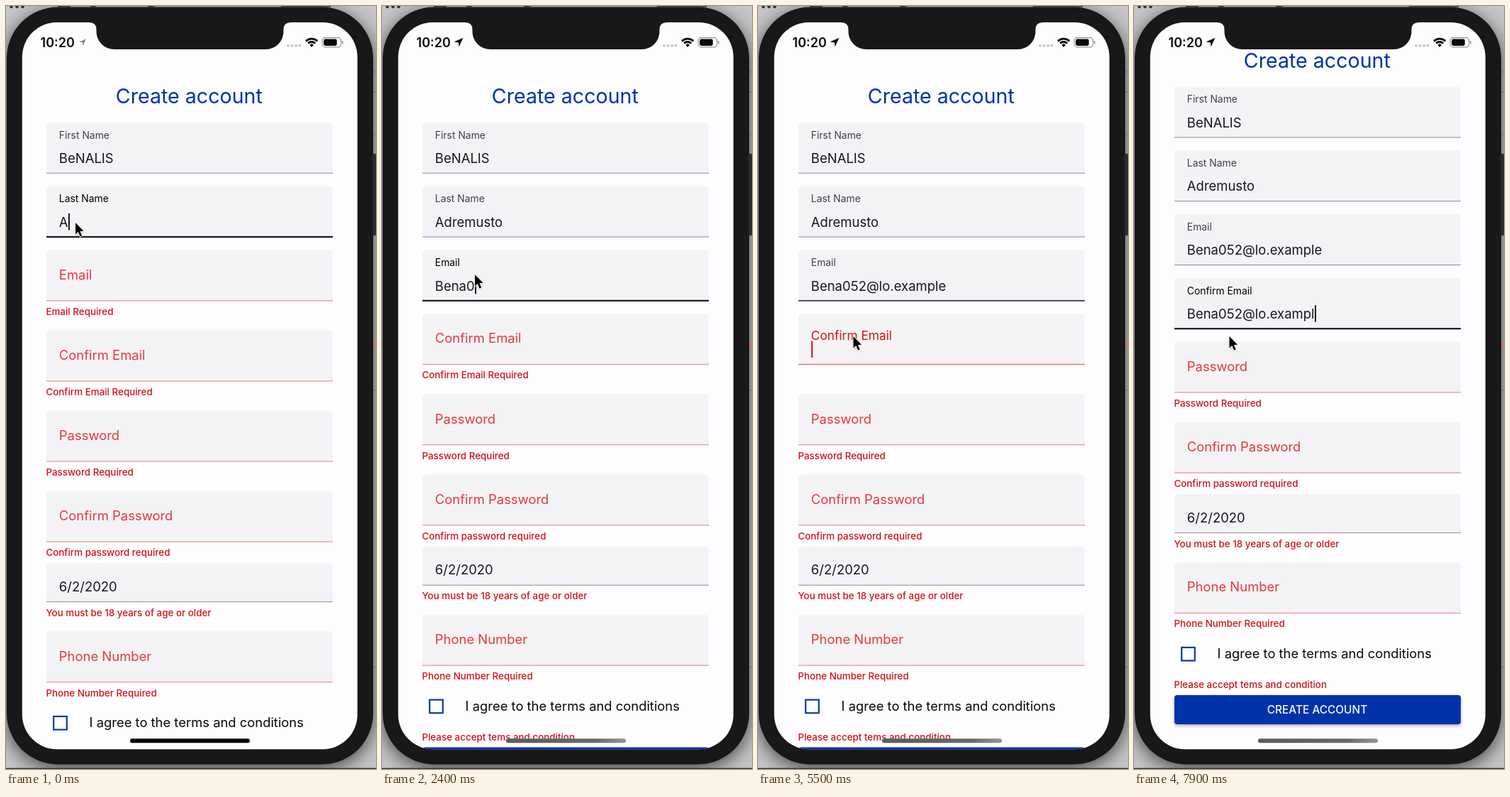
Recreate the animation shown at these times as an HTML page with a canvas. Size 522 px wide and 1074 px high, loop 8 s.

```html
<!DOCTYPE html>
<html lang="en">
<head>
<meta charset="utf-8">
<title>Create account</title>
<style>
html, body { margin: 0; width: 100%; height: 100%; overflow: hidden; }
canvas { display: block; }
</style>
</head>
<body>
<canvas id="stage" width="522" height="1074"></canvas>
<script>
const ctx = document.getElementById('stage').getContext('2d');
const LOOP = 8000, STEP = 100;
const LEFT = 57, WIDTH = 404, TEXT_X = 74.8;
const ERROR_GAP = 23.4, SCROLL = 50.3;
const FLOAT_MS = 300;

const BLACK = [24, 23, 28], GREY = [143, 142, 148], INK = [66, 65, 70];
const RED = [207, 19, 22], PLACEHOLDER = [227, 58, 60], PINK = [233, 155, 155];
const BLUE = '#0033a8', BEZEL = '#18171a';

const FIRST_NAME = 'BeNALIS';
const LAST_NAME = 'Adremusto';
const EMAIL = 'Bena052@lo.example';

// Each run is [first key time, interval, number of keys].
const keyTimes = runs => runs.flatMap(([start, gap, n]) =>
  Array.from({ length: n }, (_, i) => start + i * gap));
const LAST_KEYS = keyTimes([[0, 115, 9]]);
const EMAIL_KEYS = keyTimes([[1700, 150, 8], [3500, 130, 10]]);
const CONFIRM_KEYS = keyTimes([[5850, 125, 6], [6600, 125, 11]]);
const EMAIL_FOCUS = 1540, CONFIRM_FOCUS = 5400;

const clamp = v => Math.max(0, Math.min(1, v));
const progress = (t, start, ms) => clamp((t - start) / ms);
const lerp = (a, b, p) => a + (b - a) * p;
const smooth = p => (1 - Math.cos(Math.PI * p)) / 2;
const easeOut = p => 1 - (1 - p) ** 3;
const rgb = c => `rgb(${c.map(Math.round).join(',')})`;
const mix = (a, b, p) => a.map((v, i) => lerp(v, b[i], p));

function text(str, x, y, size, color, weight = 400, align = 'left') {
  ctx.font = `${weight} ${size}px Inter, sans-serif`;
  ctx.textAlign = align;
  ctx.fillStyle = color;
  ctx.fillText(str, x, y);
}

function box(x, y, w, h, r, color) {
  ctx.fillStyle = color;
  ctx.beginPath();
  ctx.roundRect(x, y, w, h, r);
  ctx.fill();
}

function shape(points, color) {
  ctx.fillStyle = color;
  ctx.beginPath();
  points.forEach(([x, y]) => ctx.lineTo(x, y));
  ctx.closePath();
  ctx.fill();
}

function panel(y, h, lineColor, lineWidth) {
  box(LEFT, y, WIDTH, h, [5, 5, 0, 0], '#f3f2f5');
  ctx.fillStyle = rgb(lineColor);
  ctx.fillRect(LEFT, y + h - 0.7 - lineWidth / 2, WIDTH, lineWidth);
}

function errorText(str, y) {
  text(str, 56.4, y, 13.4, rgb(RED), 500);
}

// A field moves through idle, focused and blurred states at the given times.
function field(t, y, { label, value = '', keys = [], focus = Infinity, blur = Infinity, error }) {
  const count = keys.filter(k => k <= t).length;
  const typed = keys.length ? value.slice(0, count) : value;
  const focused = t >= focus && t < blur;
  const hasError = Boolean(error) && !count;
  const float = error ? smooth(progress(t, focus, FLOAT_MS)) : 1;
  const blurred = progress(t, blur, FLOAT_MS);

  let line = GREY, lineWidth = 1, labelColor = INK;
  if (hasError) {
    line = mix(PINK, RED, float);
    lineWidth = lerp(1.3, 2.2, float);
    labelColor = focused ? RED : PLACEHOLDER;
  } else if (t >= focus) {
    line = mix(BLACK, GREY, blurred);
    if (error) line = mix(RED, line, progress(t, keys[0], 250));
    lineWidth = lerp(2.2, 1, blurred);
    labelColor = focused ? [0, 0, 0] : INK;
  }

  panel(y, 72, line, lineWidth);
  text(label, TEXT_X, y + lerp(41.2, 22.6, float), lerp(18.45, 13.9, float), rgb(labelColor));
  text(typed, TEXT_X, y + 57, 18.5, rgb(BLACK));

  if (focused) {
    const since = t - (count ? keys[count - 1] : focus);
    const x = TEXT_X + ctx.measureText(typed).width + 0.4;
    if (since % 1000 < 500) {
      ctx.fillStyle = rgb(hasError ? RED : BLACK);
      ctx.fillRect(x, y + 38.3, 2, 23.5);
    }
  }
  if (hasError && !focused) errorText(error, y + 91.2);
}

function form(t) {
  const scroll = SCROLL * easeOut(progress(t, CONFIRM_KEYS[0], 550));
  const afterEmail = t >= EMAIL_KEYS[0] ? ERROR_GAP : 0;
  const afterConfirm = afterEmail + (t >= CONFIRM_KEYS[0] ? ERROR_GAP : 0);

  ctx.save();
  ctx.translate(0, -scroll);
  text('Create account', 258.3, 137.3, 28.6, BLUE, 400, 'center');
  field(t, 164, { label: 'First Name', value: FIRST_NAME });
  field(t, 253.7, { label: 'Last Name', value: LAST_NAME, keys: LAST_KEYS, focus: 0, blur: EMAIL_FOCUS });
  field(t, 343.5, { label: 'Email', value: EMAIL, keys: EMAIL_KEYS,
    focus: EMAIL_FOCUS, blur: CONFIRM_FOCUS, error: 'Email Required' });
  field(t, 456.6 - afterEmail, { label: 'Confirm Email', value: EMAIL, keys: CONFIRM_KEYS,
    focus: CONFIRM_FOCUS, error: 'Confirm Email Required' });

  ctx.translate(0, -afterConfirm);
  field(t, 569.7, { label: 'Password', error: 'Password Required' });
  field(t, 682.8, { label: 'Confirm Password', error: 'Confirm password required' });
  panel(784.3, 55, GREY, 1);
  text('6/2/2020', TEXT_X, 823.6, 18.5, rgb(BLACK));
  errorText('You must be 18 years of age or older', 858.8);
  field(t, 880.3, { label: 'Phone Number', error: 'Phone Number Required' });

  ctx.strokeStyle = '#0b3aa6';
  ctx.lineWidth = 2.2;
  ctx.strokeRect(67.2, 1000, 18.6, 18.6);
  text('I agree to the terms and conditions', 117.6, 1015, 18.4, '#09080c');
  errorText('Please accept tems and condition', 1057);

  ctx.save();
  ctx.shadowColor = 'rgba(0,0,0,.35)';
  ctx.shadowBlur = 4;
  ctx.shadowOffsetY = 2;
  box(LEFT, 1067, WIDTH, 41, 4, BLUE);
  ctx.restore();
  text('CREATE ACCOUNT', 258.5, 1093.2, 15.4, '#f6f7ff', 500, 'center');
  ctx.restore();
}

function backdrop() {
  ctx.fillStyle = '#c6c5c7';
  ctx.fillRect(0, 0, 522, 1074);
  ctx.fillStyle = '#a5a4a7';
  for (const y of [92, 120, 180, 540, 930]) ctx.fillRect(514, y, 8, 1.5);

  ctx.save();
  ctx.shadowColor = 'rgba(0,0,0,.65)';
  ctx.shadowBlur = 26;
  ctx.shadowOffsetY = 6;
  box(1, 1.5, 517, 1066, 72, BEZEL);
  ctx.restore();

  ctx.fillStyle = '#d9714c';
  ctx.fillRect(518, 477, 4, 4);
  box(517, 208, 5, 115, 1, '#2b2a2d');
  ctx.fillStyle = '#333236';
  for (const x of [7.5, 15.5, 23.5]) {
    ctx.beginPath();
    ctx.arc(x, 1, 2.3, 0, 7);
    ctx.fill();
  }
  for (const [x, w] of [[73, 18], [119, 8], [200, 10], [388, 70]]) ctx.fillRect(x, 0, w, 1.5);
  ctx.fillRect(0, 1072.6, 522, 1.4);
}

function statusBar(t) {
  text('10:20', 48.6, 57.6, 18, '#08080a', 600);

  const active = t >= 500;
  const k = active ? 1 : 0.74;
  shape([[6.5, -6.3], [-6.5, -0.4], [-0.2, 0.4], [0.6, 6.6]]
    .map(([x, y]) => [108 + x * k, 51 + y * k]), active ? '#08080a' : '#858488');

  ctx.fillStyle = '#c9c8cc';
  for (let i = 0; i < 4; i++) {
    ctx.beginPath();
    ctx.arc(398 + i * 5.5, 55.8, 2, 0, 7);
    ctx.fill();
  }

  ctx.strokeStyle = '#08080a';
  ctx.lineWidth = 2.8;
  for (const r of [11.4, 7]) {
    ctx.beginPath();
    ctx.arc(431.2, 57.5, r, -Math.PI * 0.75, -Math.PI * 0.25);
    ctx.stroke();
  }
  ctx.fillStyle = '#08080a';
  ctx.beginPath();
  ctx.moveTo(431.2, 58);
  ctx.arc(431.2, 57.5, 3.8, -Math.PI * 0.75, -Math.PI * 0.25);
  ctx.fill();

  ctx.strokeStyle = '#929196';
  ctx.lineWidth = 1.2;
  ctx.beginPath();
  ctx.roundRect(446.3, 44.6, 26.4, 13.2, 4);
  ctx.stroke();
  box(448.2, 46.5, 18.6, 9.4, 2.4, '#08080a');
  box(474, 49, 1.8, 4.6, [0, 2, 2, 0], '#929196');
}

function notch() {
  ctx.fillStyle = BEZEL;
  ctx.beginPath();
  ctx.moveTo(117, 20);
  ctx.lineTo(117, 23);
  ctx.quadraticCurveTo(127.5, 23, 127.5, 33);
  ctx.arcTo(127.5, 61, 152, 61, 25);
  ctx.arcTo(391.5, 61, 391.5, 37, 25);
  ctx.lineTo(391.5, 33);
  ctx.quadraticCurveTo(391.5, 23, 402, 23);
  ctx.lineTo(402, 20);
  ctx.fill();
}

function homeBar(t) {
  let color = '#050507';
  if (t >= EMAIL_KEYS[0]) {
    color = ctx.createLinearGradient(175, 1031, 344, 1037);
    color.addColorStop(0, '#5a595c');
    color.addColorStop(0.75, '#68676a');
    color.addColorStop(1, '#959498');
  }
  box(175, 1031.2, 169, 6, 3, color);
}

function pointer(t) {
  const toEmail = smooth(progress(t, 800, 400));
  const toConfirm = smooth(progress(t, 4950, 350));
  const x = 98 + 33 * toEmail + 3.5 * toConfirm;
  const y = 305 + 73 * toEmail + 87 * toConfirm;
  ctx.save();
  ctx.translate(x, y);
  ctx.shadowColor = 'rgba(0,0,0,.35)';
  ctx.shadowBlur = 3;
  ctx.shadowOffsetY = 1.5;
  const arrow = [[0, 0], [0, 16.5], [3.8, 13], [6.6, 19.6], [9.2, 18.4], [6.5, 12], [11.6, 11.8]];
  shape(arrow, '#fff');
  ctx.shadowColor = 'transparent';
  ctx.strokeStyle = '#fff';
  ctx.lineWidth = 1.8;
  ctx.stroke();
  shape(arrow, '#000');
  ctx.restore();
}

function draw(t) {
  backdrop();
  ctx.save();
  box(22.8, 23, 473, 1023.2, 49, '#fdfcfe');
  ctx.clip();
  form(t);
  statusBar(t);
  homeBar(t);
  ctx.restore();
  notch();
  pointer(t);
}

const start = performance.now();
function tick() {
  const t = (performance.now() - start) % LOOP;
  draw(Math.floor(t / STEP) * STEP);
  requestAnimationFrame(tick);
}
tick();
</script>
</body>
</html>
```
